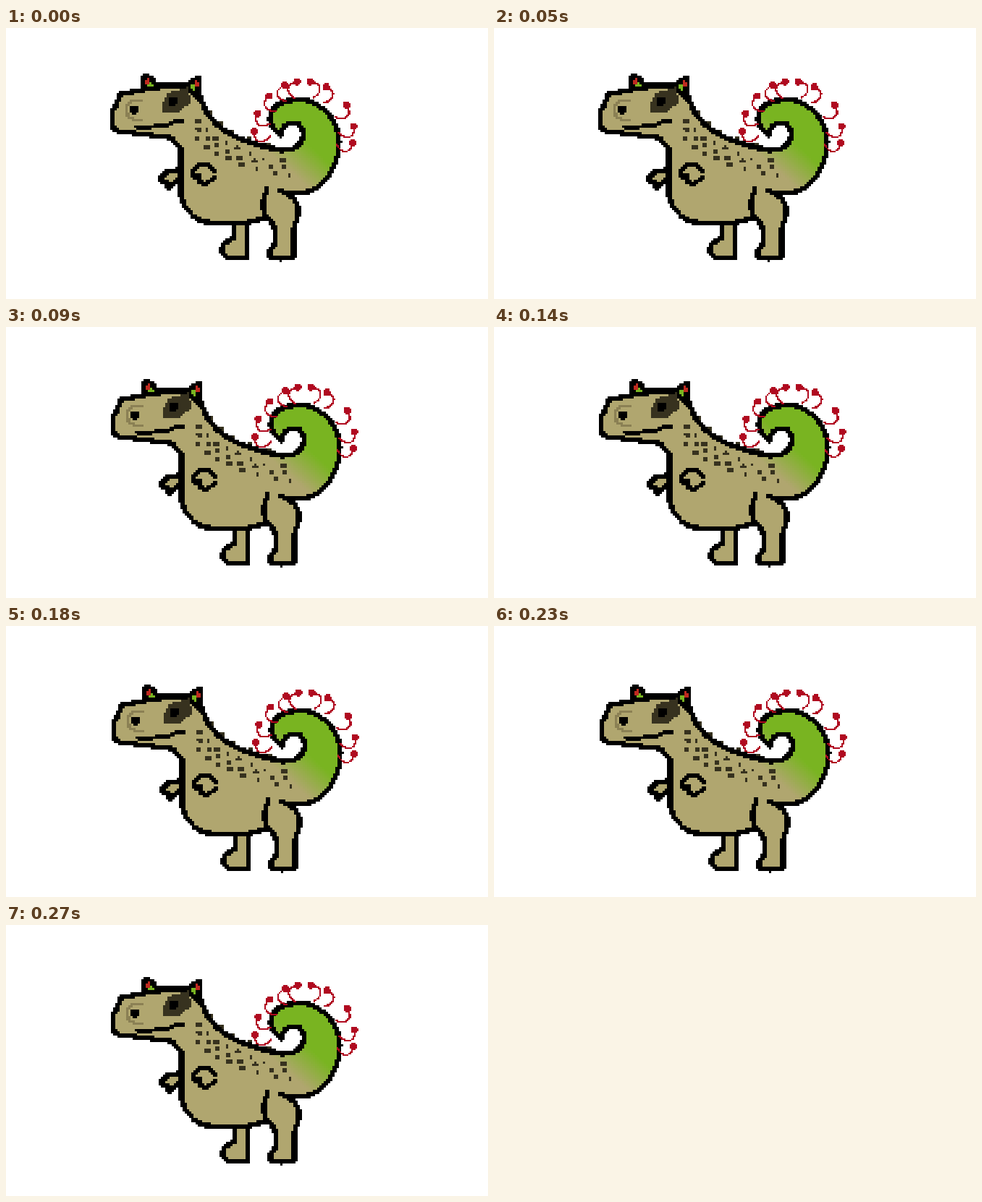
Write an HTML page with a canvas that moves like this. It is 666 px wide and 375 px high and loops after 360 ms.

```html
<!DOCTYPE html>
<html lang="en">
<head>
<meta charset="utf-8">
<title>Bobbing dinosaur</title>
<style>
  html, body { margin: 0; width: 100%; height: 100%; overflow: hidden; background: #fff; }
  canvas { position: absolute; left: 0; top: 0; image-rendering: pixelated; }
</style>
</head>
<body>
<div id="dino"></div>
<script>
const dino = document.getElementById('dino');
const TAN = '#b0a66f', GREEN = '#79b421', RED = '#b00a20', DARK = '#37321f', INK = '#000';

// A canvas of square cells; every shape is cut to hard pixel edges.
function pixelLayer(cell) {
  const width = Math.ceil(666 / cell), height = Math.ceil(375 / cell);
  const makeCanvas = () => Object.assign(document.createElement('canvas'), { width, height });
  const view = makeCanvas(), scratch = makeCanvas();
  view.style.width = width * cell + 'px';
  view.style.height = height * cell + 'px';
  dino.append(view);
  const out = view.getContext('2d');
  const pen = scratch.getContext('2d', { willReadFrequently: true });
  pen.scale(1 / cell, 1 / cell);
  pen.lineJoin = pen.lineCap = 'round';

  function stamp(draw) {
    pen.clearRect(0, 0, 700, 400);
    draw();
    const image = pen.getImageData(0, 0, width, height);
    for (let i = 3; i < image.data.length; i += 4) image.data[i] = image.data[i] > 120 ? 255 : 0;
    pen.putImageData(image, 0, 0);
    out.drawImage(scratch, 0, 0);
  }
  return {
    pen,
    fill(path, color) {
      stamp(() => { pen.fillStyle = color; pen.fill(new Path2D(path)); });
    },
    line(path, color = INK, size = 7) {
      stamp(() => { pen.strokeStyle = color; pen.lineWidth = size; pen.stroke(new Path2D(path)); });
    },
    shape(path, color = TAN) { this.fill(path, color); this.line(path); }
  };
}

const box = (x, y, w, h = w) => `M${x - w / 2} ${y - h / 2}h${w}v${h}h${-w}z`;

function seededRandom(seed) {
  return () => (seed = seed * 16807 % 2147483647) / 2147483647;
}

// The ridge is one quadratic curve; depth moves a point into the body.
const ridge = [[269, 95], [280, 150], [375, 168]];
function ridgePoint(t, depth) {
  const [a, b, c] = ridge;
  const at = i => (1 - t) ** 2 * a[i] + 2 * t * (1 - t) * b[i] + t * t * c[i];
  const slope = i => (1 - t) * (b[i] - a[i]) + t * (c[i] - b[i]);
  const length = Math.hypot(slope(0), slope(1));
  return [at(0) - depth * slope(1) / length, at(1) + depth * slope(0) / length];
}

function drawSpots(art) {
  const random = seededRandom(29);
  for (let row = 0; row < 3; row++) {
    for (let t = 0.25 + row * 0.04; t < 1.12; t += 0.11) {
      const [x, y] = ridgePoint(t + random() * 0.03, 14 + row * 8 + random() * 4);
      const size = 4 + random() * 5;
      art.fill(box(x, y, size, Math.min(size, 6)), DARK);
    }
  }
}

function drawFace(art) {
  art.shape('M190 85V67H197L209 79V84z', GREEN);
  art.shape('M248 81L266 68V98z', GREEN);
  art.fill(box(196, 74, 5, 8) + box(263, 77, 5, 9), '#c02a20');

  art.fill('M215 108L223 90 252 82 255 103 238 118H217z', DARK);
  art.fill(box(230, 101, 12), INK);
  art.line('M186 101C160 93 158 129 186 128', '#8b8054', 4);
  art.fill(box(177, 113, 11), INK);
  art.line('M180 137L196 139 206 135H222L231 130H245', INK, 5);
}

function drawBody() {
  const art = pixelLayer(3);
  const [start, bend, end] = ridge;
  const head = `M${start}L248 80H209L191 85 158 92 153 105 147 116V137L156 143 228 152 241 166`;
  const belly = 'V232C248 254 264 270 286 270H330L357 263 378 227 408 229';
  const tail = 'C440 225 462 188 460 155C458 120 425 95 398 99C372 101 360 118 367 135L380 149' +
    'C378 138 388 131 398 131C408 132 415 145 408 157C402 167 388 170 ' + end;
  const body = head + belly + tail + `Q${bend} ${start}z`;

  for (let t = 0.25; t < 1; t += 0.17) art.fill(box(...ridgePoint(t, -3), 7), DARK);

  art.shape('M315 268V290L300 299 298 310 306 318H333V268');
  art.shape('M240 196L222 199 213 208 215 213 223 214 224 222 240 208');

  const skin = art.pen.createLinearGradient(398, 203, 428, 170);
  skin.addColorStop(0, TAN);
  skin.addColorStop(1, GREEN);
  art.shape(body, skin);

  drawSpots(art);
  drawFace(art);
  art.line('M289 198L280 190H266L257 197 259 206 268 205 267 213 275 216 289 207', INK, 6);
  art.shape('M361 222C353 240 353 258 366 267Q376 282 371 300L364 309V317L380 319 398 317' +
    'V275C407 254 410 236 378 225');
}

// Beads fan around the tail on hooked stalks that lean away from the top.
function drawTailBeads() {
  const art = pixelLayer(2);
  const polar = (degrees, radius) => {
    const angle = degrees * Math.PI / 180;
    return [412 + radius * Math.cos(angle), 143 + radius * Math.sin(angle)];
  };
  for (const angle of [180, 201, 225, 247, 262, 277, 296, 328, 354, 373]) {
    const lean = angle < 270 ? -1 : 1;
    const bead = polar(angle, 69);
    const hook = [polar(angle + 14 * lean, 72), polar(angle + 18 * lean, 58), polar(angle + 8 * lean, 48)];
    art.line(`M${bead}C${hook.join(' ')}`, RED, 2.5);
    art.line(`M${bead}h.1`, RED, 10);
  }
}

drawBody();
drawTailBeads();

// Bounce down and back up in four held poses.
const STEP = 90, DROP = 18.5, SWAY = 1.5;
function frame() {
  const pose = Math.floor(performance.now() / STEP) % 4;
  const depth = (1 - Math.cos(pose * Math.PI / 2)) / 2;
  dino.style.transform = `translate(${depth * SWAY}px, ${Math.floor(depth * DROP)}px)`;
  requestAnimationFrame(frame);
}
frame();
</script>
</body>
</html>
```
